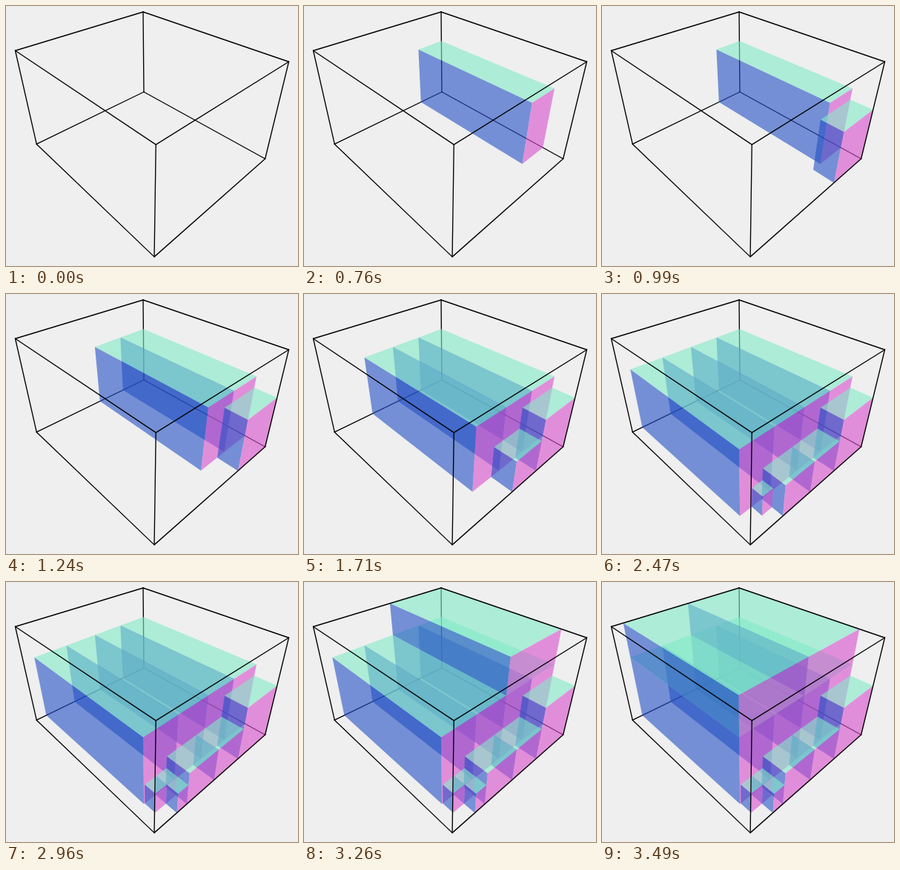
An HTML page with a canvas that plays this animation: 394 px wide and 351 px high, repeating every 4590 ms.

```html
<!DOCTYPE html>
<html>
<head>
<meta charset="utf-8">
<title>Box packing</title>
<style>
  html, body { margin: 0; width: 100%; height: 100%; overflow: hidden; background: #efefef; }
  canvas { display: block; }
</style>
</head>
<body>
<canvas id="stage" width="394" height="351"></canvas>
<script>
const ctx = document.getElementById('stage').getContext('2d');
const LOOP = 4590;
const BLUE = 'rgba(36,81,197,.6)', GREEN = 'rgba(131,236,201,.6)', PINK = 'rgba(217,79,206,.6)';

// Perspective: container origin plus weighted vanishing points for x, y, z in 0..1
function project([x, y, z]) {
  const p = -0.2415 * x, q = -0.197 * y, r = -0.1281 * z, w = 1 + p + q + r;
  return [
    (186 - 328 * p + 776 * q + 192.7 * r) / w,
    (116 - 167.5 * p - 171 * q + 851 * r) / w
  ];
}

// Long boxes fill the back; small ones fill the strip beside them
const LONG = 0.868, MID = 0.934, STEP = 0.2315, LOW = 2 / 3, TINY = 0.21;

// time, x0, x1, y0, y1, z0, z1
const boxes = [
  [760, 0, LONG, 0, STEP, 0, LOW],
  [990, LONG, 1, 0, 0.305, 0, 0.551],
  [1240, 0, LONG, STEP, 2 * STEP, 0, LOW],
  [1540, LONG, 1, 0.305, 0.535, 0, 1 / 3],
  [1710, 0, LONG, 2 * STEP, 3 * STEP, 0, LOW],
  [2010, LONG, 1, 0.535, 0.765, 0, 1 / 3],
  [2240, 0, LONG, 3 * STEP, 4 * STEP, 0, LOW],
  [2470, LONG, MID, 0.765, 0.841, 0, TINY],
  [2740, MID, 1, 0.765, 0.841, 0, TINY],
  [2960, LONG, MID, 0.841, 0.92, 0, TINY],
  [3260, 0, LONG, 0, 2 * STEP, LOW, 1],
  [3490, 0, LONG, 2 * STEP, 4 * STEP, LOW, 1]
].sort((a, b) => a[1] - b[1]); // far to near

function trace(points) {
  ctx.beginPath();
  points.forEach(p => ctx.lineTo(...project(p)));
}

function face(color, ...points) {
  trace(points);
  ctx.fillStyle = color;
  ctx.fill();
}

function drawBox([, x0, x1, y0, y1, z0, z1]) {
  face(GREEN, [x0, y0, z1], [x1, y0, z1], [x1, y1, z1], [x0, y1, z1]);
  face(BLUE, [x0, y1, z0], [x1, y1, z0], [x1, y1, z1], [x0, y1, z1]);
  face(PINK, [x1, y0, z0], [x1, y1, z0], [x1, y1, z1], [x1, y0, z1]);
}

// Edges meeting at the hidden corner lie behind the boxes
const edges = { back: [], front: [] };
for (let axis = 0; axis < 3; axis++) {
  for (const [u, v] of [[0, 0], [0, 1], [1, 0], [1, 1]]) {
    const ends = [0, 1].map(t => {
      const p = [u, v];
      p.splice(axis, 0, t);
      return p;
    });
    (u || v ? edges.front : edges.back).push(ends);
  }
}

function drawEdges(list) {
  for (const ends of list) {
    trace(ends);
    ctx.stroke();
  }
}

function draw(now) {
  const t = now % LOOP;
  ctx.fillStyle = '#efefef';
  ctx.fillRect(0, 0, 394, 351);
  ctx.strokeStyle = '#000';
  ctx.lineWidth = 1.35;
  ctx.lineCap = 'round';
  drawEdges(edges.back);
  boxes.filter(b => t >= b[0]).forEach(drawBox);
  drawEdges(edges.front);
}

const start = performance.now();
function tick() {
  draw(performance.now() - start);
  requestAnimationFrame(tick);
}
tick();
</script>
</body>
</html>
```
